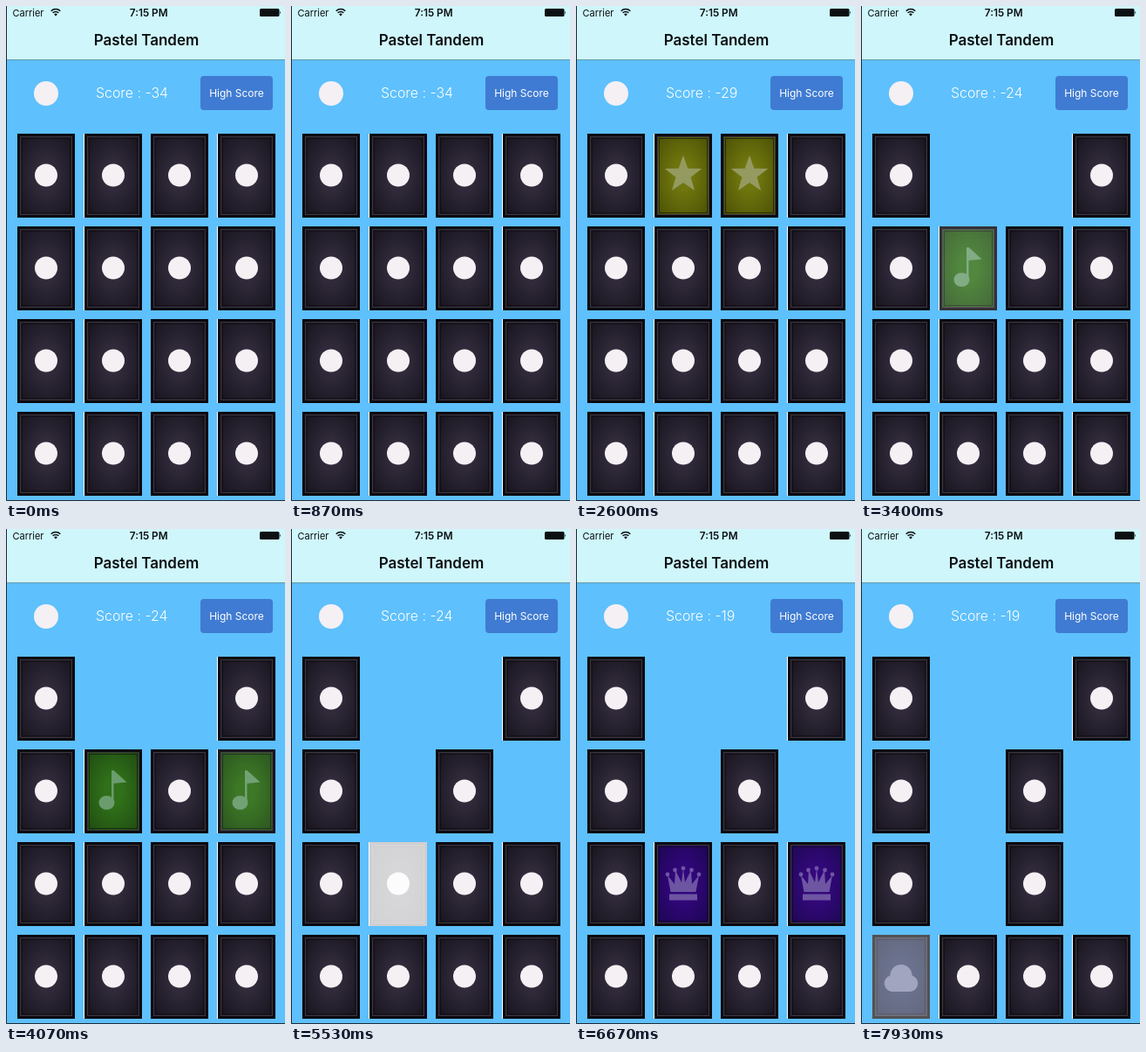
Animation of 320x566 px, one loop 8000 ms. Source, as an HTML page:

```html
<!DOCTYPE html>
<html lang="en">
<head>
<meta charset="utf-8">
<title>Pastel Tandem</title>
<style>
  html, body { margin: 0; width: 100%; height: 100%; overflow: hidden; background: #5ec0fc; }
  svg { display: block; width: 100%; height: 100%; font-family: Inter, Roboto, sans-serif; }
</style>
</head>
<body>
<svg viewBox="0 0 320 566" xmlns="http://www.w3.org/2000/svg">
  <defs id="defs"></defs>
  <rect width="320" height="566" fill="#5ec0fc"/>
  <rect width="320" height="61" fill="#cff6fa"/>
  <rect y="61" width="320" height="1" fill="#689aa8"/>
  <path d="M.5 0V565.5H320" fill="none" stroke="#1d2b36"/>

  <g fill="#0b0f12">
    <text x="7.5" y="11.5" font-size="11">Carrier</text>
    <text x="163.7" y="11.5" font-size="11.8" font-weight="600" text-anchor="middle">7:15 PM</text>
    <text x="161" y="45" font-size="17" font-weight="600" text-anchor="middle">Pastel Tandem</text>
    <path d="M57 11.6l-1.9-2.1a2.7 2.7 0 0 1 3.8 0z"/>
    <path d="M53.6 7.8a4.8 4.8 0 0 1 6.8 0M51.7 5.7a7.5 7.5 0 0 1 10.6 0" fill="none" stroke="#0b0f12" stroke-width="1.5"/>
    <rect x="291" y="3" width="22.5" height="9" rx="1.6"/>
    <path d="M314.3 5.7q1.8 1.7 0 3.5z"/>
  </g>

  <circle cx="46" cy="100" r="14" fill="#f4f0f4"/>
  <text id="score" x="103" y="105" font-size="15.9" font-weight="300" fill="#fff"></text>
  <rect x="223" y="80" width="83" height="39" rx="4" fill="#3f7bd2"/>
  <text x="264.5" y="104" font-size="12" fill="#fff" text-anchor="middle">High Score</text>
  <g id="board"></g>
</svg>
<script>
const LOOP = 8000, FADE_OUT = 250, FADE_IN = 500;
const $ = id => document.getElementById(id);

// Card faces: centre colour, edge colour, picture colour, picture
const crownDots = [[15, 37], [23.5, 32], [33, 30], [42.5, 32], [51, 37]]
  .map(([x, y]) => `<circle cx="${x}" cy="${y}" r="2.4"/>`).join('');
const starPoints = Array.from({ length: 10 }, (_, i) => {
  const r = i % 2 ? 9 : 22.3, a = Math.PI * (i / 5 - .5);
  return `${33 + r * Math.cos(a)},${47 + r * Math.sin(a)}`;
}).join(' ');

const faces = {
  back: ['#302a3a', '#17131d', '#f4f0f4', '<circle cx="33" cy="47.5" r="13"/>'],
  star: ['#6f760e', '#4a4f04', '#949a60', `<polygon points="${starPoints}"/>`],
  note: ['#307019', '#1f4a12', '#6a9c6e',
    '<ellipse cx="25.5" cy="61" rx="9" ry="8"/><path d="M31 61V24h2.5l15 13.5-15 1.5v22z"/>'],
  crown: ['#33067d', '#1b0650', '#6d55a2',
    crownDots + '<path d="M18.5 57L15 38l8 10 1-16 7 14 2-16 2 16 7-14 1 16 8-10-3.5 19zM17 59.5h32v7H17z"/>'],
  cloud: ['#303a62', '#222947', '#7b81a5',
    '<path d="M22 65a9.5 9.5 0 0 1-1.5-18.5 12.5 12.5 0 0 1 25 0A9.5 9.5 0 0 1 44 65z"/>']
};

$('defs').innerHTML = Object.entries(faces).map(([name, [mid, edge, ink, art]]) => `
  <radialGradient id="${name}Fill" r=".72">
    <stop offset=".25" stop-color="${mid}"/><stop offset="1" stop-color="${edge}"/>
  </radialGradient>
  <g id="${name}">
    <rect width="66" height="96" fill="#0b0910"/>
    <rect x="3.5" y="3.5" width="59" height="89" fill="url(#${name}Fill)" stroke="#3a373d"/>
    <rect x="5.5" y="5.5" width="55" height="85" fill="none" stroke="#0d0b12" stroke-opacity=".6"/>
    <g fill="${ink}">${art}</g>
  </g>`).join('');

// Turned cards: grid index, face, tap time, time it leaves the board
const turns = [
  [1, 'star', 960, 2850], [2, 'star', 1850, 2850],
  [5, 'note', 2780, 4395], [7, 'note', 3395, 4395],
  [9, 'crown', 5350, 6955], [11, 'crown', 5955, 6955],
  [12, 'cloud', 7360, Infinity]
];
const scores = [[0, -34], [1850, -29], [3395, -24], [5955, -19]];

const cells = Array.from({ length: 16 }, (_, i) => {
  const col = i % 4, row = i >> 2, bleed = col % 2;
  const x = Math.ceil(13 + 76.5 * col), y = 146 + 106 * row;
  const turn = turns.find(t => t[0] === i);
  $('board').insertAdjacentHTML('beforeend', `<g transform="translate(${x} ${y})">
    <rect x="${-bleed}" width="${66 + bleed}" height="96" fill="#fff"/>
    <use href="#back"/>${turn ? `<use href="#${turn[1]}"/>` : ''}</g>`);
  const node = $('board').lastElementChild;
  const [back, front] = node.querySelectorAll('use');
  return { node, back, front, turn };
});

const ease = v => {
  const k = Math.max(0, Math.min(1, v));
  return k * k * (3 - 2 * k);
};

function draw(t) {
  for (const { node, back, front, turn } of cells) {
    if (!turn) continue;
    const age = t - turn[2];
    node.style.display = t < turn[3] ? '' : 'none';
    back.style.opacity = 1 - ease(age / FADE_OUT);
    front.style.opacity = ease((age - FADE_OUT) / FADE_IN);
  }
  $('score').textContent = 'Score : ' + scores.filter(s => s[0] <= t).pop()[1];
}

const start = performance.now();
function tick() {
  draw((performance.now() - start) % LOOP);
  requestAnimationFrame(tick);
}
tick();
</script>
</body>
</html>
```
